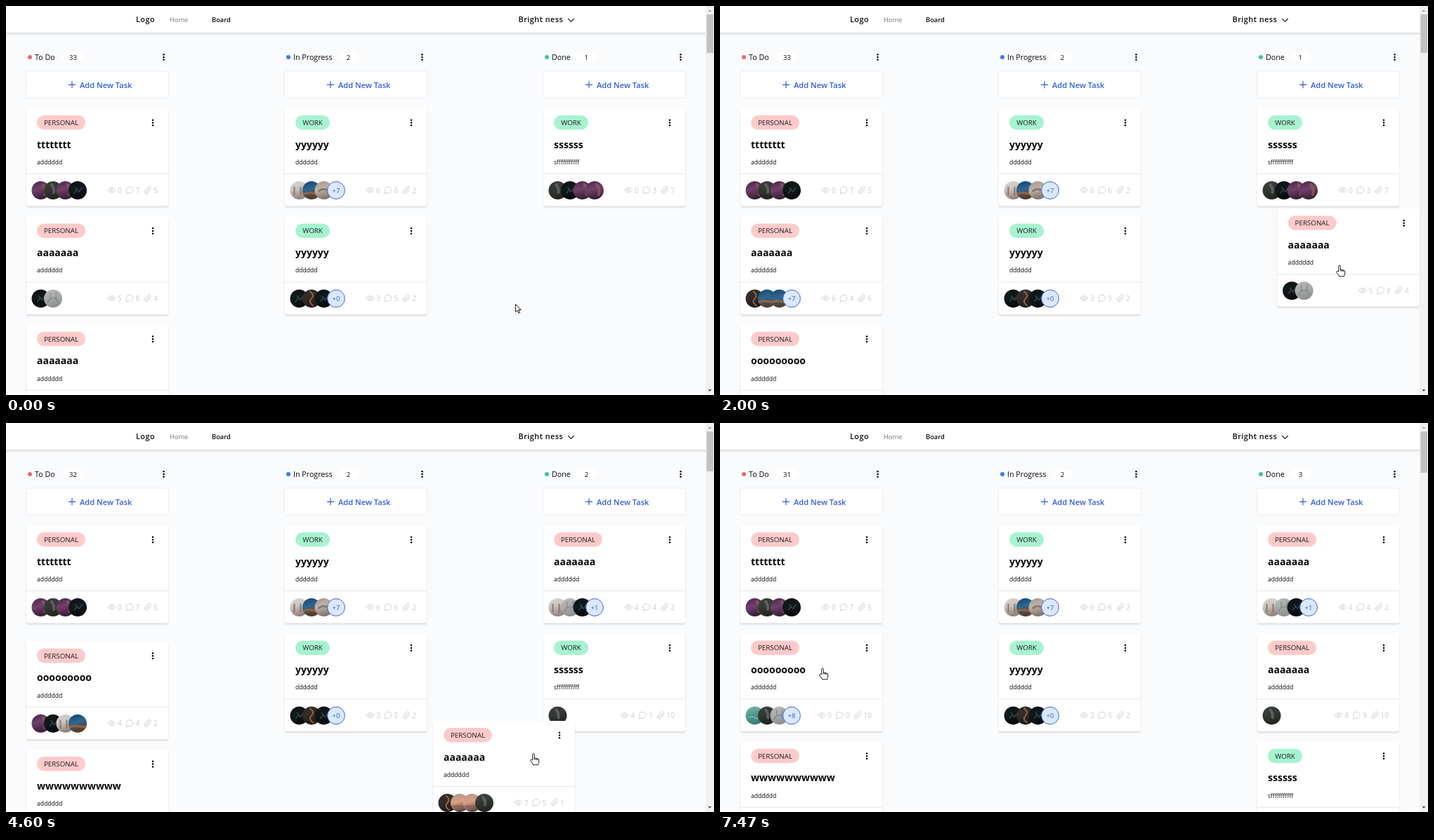
An HTML page that plays this animation: 1008x555 px, repeating every 8000 ms.

```html
<!DOCTYPE html>
<html lang="en">
<head>
<meta charset="utf-8">
<title>Task board</title>
<style>
  html, body { margin: 0; width: 100%; height: 100%; overflow: hidden; background: #f9fbfd; }
  svg { display: block; width: 100%; height: 100%; }
  text { font-family: "Open Sans", "Noto Sans", sans-serif; fill: #0b0b0f; white-space: pre; }
  .brand { font-size: 10.9px; font-weight: 600; letter-spacing: .45px; }
  .nav { font-size: 9.3px; }
  .head { font-size: 10.7px; }
  .small { font-size: 9.5px; text-anchor: middle; }
  .add { font-size: 11.1px; font-weight: 600; fill: #2f5fe0; }
  .tag { font-size: 9.8px; text-anchor: middle; fill: #1b1b22; }
  .title { font-size: 14px; font-weight: 700; }
  .desc { font-size: 8.6px; }
  .stat { font-size: 10px; fill: #c8ccd2; }
  .icon { fill: none; stroke: #c8ccd2; stroke-width: .9; stroke-linecap: round; }
  .line { fill: none; stroke: #2f5fe0; stroke-width: 1.2; }
  .detail { fill: none; stroke-linecap: round; opacity: .75; }
  .card { fill: #fff; filter: drop-shadow(0 2px 1.2px rgba(0, 0, 0, .13)); }
  .button { fill: #fff; filter: drop-shadow(0 .9px .9px rgba(0, 0, 0, .14)); }
  .bar { fill: #fff; filter: drop-shadow(0 1.5px 2px rgba(0, 0, 0, .2)); }
  .cursor { fill: #fff; stroke: #000; stroke-width: .9; stroke-linejoin: round; }
</style>
</head>
<body>
<svg id="stage" viewBox="0 0 1008 555"></svg>
<script>
const LOOP = 8000, TICK = 200 / 3, TOP = 146, STEP = 154.4;
const COLUMNS = [29, 397, 765];
const RENDER_AT = [0, 2530, 5470];

// Avatar tones from top to bottom, plus one detail stroke: [path, colour, width]
const AVATARS = {
  purple: [['#46264f', '#70406a', '#3a2038'], ['M3-8Q8-3 6 6', '#8f5a58', 4]],
  forest: [['#3b403c', '#343833', '#22261f'], ['M-2-8Q2-3 1 3', '#686d69', 4]],
  black: [['#0b1114', '#10191c', '#070b0d'], ['M-5 4L-1-1 2 2 6-4M-3-4L1 1', '#3c5553', 1.6]],
  grey: [['#b9bbba', '#a8abaa', '#8f9392'], ['M-8 6Q0-8 8 6M-4-8V0M4-9V1', '#777b7a', 1.2]],
  white: [['#d6d4d2', '#cbc3bd', '#94857c'], ['M-7-4V6M2-4V6M7 2V7', '#7d6d65', 2.4]],
  blue: [['#0f4578', '#2f678f', '#5b3a2a'], ['M-11 5Q-4 3 1 4T11 5', '#a8683a', 3.4]],
  sand: [['#a3978d', '#c0b4a7', '#85776b'], ['M-7 1Q0-5 8 2', '#75685f', 3]],
  dna: [['#2b2a2d', '#352c29', '#1d1b1c'], ['M-2-10Q5-5 0 0T2 10', '#b5794a', 2]],
  sunset: [['#a9938f', '#dba083', '#5f4a46'], ['M-9 5H9', '#805d52', 3]],
  sea: [['#7fb8ad', '#4f9a90', '#3c7f78'], ['M-9 3Q-4 0 0 3T9 2', '#8fc7bb', 1.5]]
};

const ICONS = [
  'M-5.5 0Q0-7.4 5.5 0Q0 7.4-5.5 0zM-1.8 0a1.8 1.8 0 1 0 3.6 0a1.8 1.8 0 1 0-3.6 0z',
  'M-5 4.8L-4.3 2.4A4.9 4.6 0 1 1-1.8 4.2z',
  'M4.6-.6L0 4A2.8 2.8 0 0 1-4 0L.9-4.8A1.9 1.9 0 0 1 3.6-2.1L-1 2.5A.9.9 0 0 1-2.3 1.2L1.9-3'
];

const text = (x, y, kind, str, extra = '') =>
  `<text x="${x}" y="${y}" class="${kind}" ${extra}>${str}</text>`;
const group = (x, y, body, id = '') =>
  `<g transform="translate(${x} ${y})"${id && ` id="${id}"`}>${body}</g>`;
const kebab = (x, y) =>
  [-3.8, 0, 3.8].map(d => `<circle cx="${x}" cy="${y + d}" r="1.25"/>`).join('');

function avatar(name, i) {
  const x = 20.5 + 17.5 * i;
  if (name[0] === '+') {
    return `<circle cx="${x}" cy="117" r="12.4" fill="#dbe8fd" stroke="#3767e0"/>` +
      text(x, 120.5, 'small', name, 'style="fill:#2f5fe0"');
  }
  const [path, color, width] = AVATARS[name][1];
  return group(x, 117, `<circle r="13" fill="url(#${name})"/>
    <path class="detail" d="${path}" stroke="${color}" stroke-width="${width}"/>`);
}

function stats(values) {
  let right = 187, out = '';
  for (let i = 2; i >= 0; i--) {
    const width = 5.7 * String(values[i]).length, start = right - width;
    out += text(start, 120.6, 'stat', values[i]) +
      group(start - 8.4, 116.6, `<path class="icon" d="${ICONS[i]}"/>`);
    right = start - 20;
  }
  return out;
}

function card(title, people, values) {
  const work = /[ys]/.test(title);
  const desc = { y: 'dddddd', s: 's' + 'f'.repeat(11) }[title[0]] || 'adddddd';
  const width = work ? 49 : 69;
  return `<rect class="card" width="202" height="139.5" rx="3"/>
    <rect x="15" y="10" width="${width}" height="20.5" rx="10.2" fill="${work ? '#a7f3d0' : '#fecaca'}"/>` +
    text(15 + width / 2, 24, 'tag', work ? 'WORK' : 'PERSONAL') +
    kebab(180, 20.5) + text(15, 56.5, 'title', title) + text(15, 80, 'desc', desc) +
    '<path d="M0 93.5H202" stroke="#e5e7eb"/>' +
    people.split(' ').map(avatar).join('') + stats(values);
}

const place = (col, slot, ...args) =>
  group(COLUMNS[col], TOP + STEP * slot, card(...args));

function columnHead(x, name, color, countX, id, count) {
  return group(x, 0, `<circle cx="5" cy="73" r="3" fill="${color}"/>` +
    text(12, 76.7, 'head', name) +
    `<rect x="${countX - 15}" y="66" width="30" height="14" rx="7" fill="#fff"/>` +
    text(countX, 76.6, 'small', count, `id="${id}"`) + kebab(195.5, 73) +
    '<rect class="button" y="93.5" width="202" height="37" rx="3"/>' +
    '<path class="line" d="M60 112.3h10M65 107.3v10"/>' + text(76, 117, 'add', 'Add New Task'));
}

const A = 'aaaaaaa', O = 'ooooooooo', W = 'wwwwwwwwww', S = 'ssssss';
const doneTop = place(2, 0, A, 'white grey black +1', [4, 4, 2]);

const phases = [
  place(2, 0, S, 'forest black purple purple', [0, 3, 7]) +
  `<g id="shift0">${place(0, 2, A, 'dna blue blue +7', [6, 4, 6])}
    ${place(0, 3, O, 'purple black white blue', [4, 4, 2])}</g>` +
  group(29, 300, card(A, 'black grey', [5, 8, 4]), 'drag0'),

  doneTop + place(2, 1, S, 'forest', [4, 1, 10]) +
  `<g id="shift1">${place(0, 2, O, 'purple black white blue', [4, 4, 2])}
    ${place(0, 3, W, 'sea forest', [3, 2, 6])}</g>` +
  group(29, 300, card(A, 'dna sunset sunset forest', [7, 5, 1]), 'drag1'),

  doneTop + place(2, 1, A, 'forest', [8, 9, 10]) + place(2, 2, S, 'black dna', [2, 6, 1]) +
  place(0, 1, O, 'sea forest grey +8', [0, 0, 10]) + place(0, 2, W, 'purple sea', [1, 4, 3])
];

const gradients = Object.entries(AVATARS).map(([name, [tones]]) =>
  `<linearGradient id="${name}" x2=".25" y2="1">${tones.map((c, i) =>
    `<stop offset="${i / 2}" stop-color="${c}"/>`).join('')}</linearGradient>`).join('');

const $ = id => document.getElementById(id);
$('stage').innerHTML = `<defs>${gradients}</defs>
  <rect width="1008" height="555" fill="#f9fbfd"/>` +
  columnHead(COLUMNS[0], 'To Do', '#ea6a66', 66.5, 'todo', 33) +
  columnHead(COLUMNS[1], 'In Progress', '#3b7de8', 90.5, 'doing', 2) +
  columnHead(COLUMNS[2], 'Done', '#3cc5a0', 61.5, 'done', 1) +
  place(0, 0, 'tttttttt', 'purple forest purple black', [0, 7, 5]) +
  place(1, 0, 'yyyyyy', 'white blue sand +7', [6, 6, 2]) +
  place(1, 1, 'yyyyyy', 'black dna black +0', [3, 5, 2]) +
  phases.map((body, i) => `<g id="phase${i}">${body}</g>`).join('') +
  '<rect class="bar" x="-5" y="-5" width="1010" height="43"/>' +
  text(185, 23.3, 'brand', 'Logo') +
  text(233, 23, 'nav', 'Home', 'style="fill:#72767e"') +
  text(293, 23, 'nav', 'Board', 'font-weight="600"') +
  text(729.5, 23.3, 'brand', 'Bright ness') +
  `<path d="M800.3 18l4.2 4.3 4.2-4.3" fill="none" stroke="#222" stroke-width="1.2"/>
  <rect x="996" width="12" height="555" fill="#f1f1f1"/>
  <rect id="thumb" x="997.5" y="12" width="9.5" height="55" fill="#c1c1c1"/>
  <path d="M999.5 8l2.5-3 2.5 3z" fill="#a3a3a3"/>
  <path d="M999.5 547l2.5 3 2.5-3z" fill="#505050"/>
  <g id="cursor" class="cursor">
    <path id="arrow" d="M.4.4V11.4L3 9.1 4.8 13.2 6.6 12.4 4.8 8.5H8.2z"/>
    <path id="hand" d="M-1.3 9V1.3a1.3 1.3 0 0 1 2.6 0V6L6 7q1.7.4 1.7 2V12q0 1.4-1 2.4V15.8H-.6V14.6L-4 10.4q-1-1.5.2-2.1 1.2-.4 2.5.9M1.3 6v2.6M3.6 6.6v2.4M5.7 7v2.2"/>
  </g>`;

const smooth = u => u * u * (3 - 2 * u);
const out = u => 1 - (1 - u) ** 2;
const pow = n => u => u ** n;
const linear = pow(1);

// Keys are [time, x, y, easing into this key]
const cursorKeys = [
  [0, 725, 425], [870, 95, 394], [1400, 836, 391, pow(1.6)], [1730, 882, 370, out],
  [2530, 882, 370], [3330, 145, 330], [3400, 145, 330], [3600, 230, 350], [3870, 79, 345],
  [4130, 140, 348], [4270, 140, 348], [4600, 751, 472, pow(1.3)], [4870, 884, 494, out],
  [5470, 884, 494], [5730, 868, 488], [5800, 868, 488], [5930, 842, 474], [6070, 842, 474],
  [6330, 61, 318], [6600, 61, 318], [6800, 300, 340], [7130, 26, 352], [7470, 146, 350]
];
const drags = [
  { leave: 1130, keys: [[870, 29, 300.4], [1400, 716, 306, pow(1.6)], [1730, 812, 280, out],
    [1870, 812, 280], [2000, 793.6, 289.3, linear], [2200, 765, 300.4, out]] },
  { leave: 4430, keys: [[4270, 29, 300.4], [4600, 608, 425, pow(1.3)], [4870, 774, 444, out],
    [5000, 774, 444], [5270, 765, 454.8]] }
];

function at(keys, t) {
  const i = keys.findIndex(k => k[0] > t);
  if (i < 0) return keys.at(-1).slice(1, 3);
  if (i === 0) return keys[0].slice(1, 3);
  const [t0, x0, y0] = keys[i - 1], [t1, x1, y1, ease = smooth] = keys[i];
  const u = ease((t - t0) / (t1 - t0));
  return [x0 + (x1 - x0) * u, y0 + (y1 - y0) * u];
}

const move = (id, [x, y]) => $(id).setAttribute('transform', `translate(${x} ${y})`);
const show = (id, on) => $(id).setAttribute('display', on ? 'inline' : 'none');

function draw(time) {
  const t = Math.floor((time % LOOP + 4) / TICK) * TICK;
  const phase = RENDER_AT.filter(start => t >= start - 4).length - 1;
  phases.forEach((_, i) => show('phase' + i, i === phase));
  $('todo').textContent = 33 - phase;
  $('done').textContent = 1 + phase;
  $('thumb').setAttribute('height', 55 + 2 * phase);

  drags.forEach(({ leave, keys }, i) => {
    move('drag' + i, at(keys, t));
    move('shift' + i, [0, t < leave ? 0 : -STEP * (1 - Math.exp((leave - t) / 65))]);
  });

  const pos = at(cursorKeys, t);
  const dragging = drags.some(({ keys }) => t >= keys[0][0] && t <= keys.at(-1)[0]);
  const hand = dragging || COLUMNS.some(x => pos[0] >= x && pos[0] <= x + 202);
  move('cursor', pos);
  show('hand', hand);
  show('arrow', !hand);
}

const begin = performance.now();
function frame() {
  draw(performance.now() - begin);
  requestAnimationFrame(frame);
}
frame();
</script>
</body>
</html>
```
